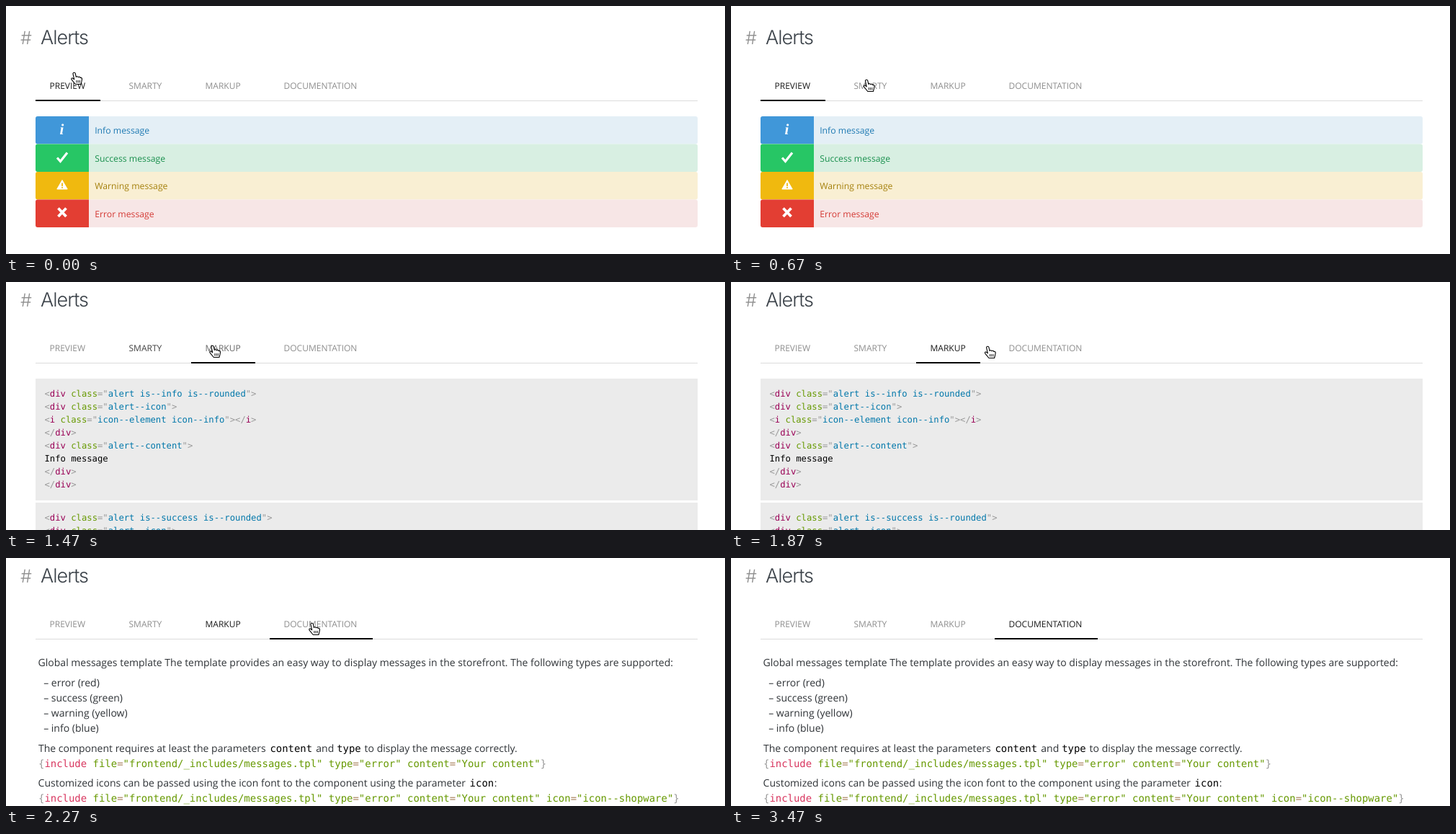
Animation of 998x344 px, one loop 3540 ms. Source, as an HTML page:

```html
<!DOCTYPE html>
<html lang="en">
<head>
<meta charset="utf-8">
<title>Alerts</title>
<style>
  html, body { margin: 0; width: 100%; height: 100%; overflow: hidden; background: #fff; }
  svg { display: block; width: 998px; height: 344px; }
  text { font-family: "Open Sans", sans-serif; white-space: pre; text-rendering: geometricPrecision; }
  .mono { font-family: "DejaVu Sans Mono", monospace; }
  .title { font-family: Inter, sans-serif; font-weight: 300; }
</style>
</head>
<body>
<svg id="stage" viewBox="0 0 998 344"></svg>
<script>
const LOOP = 3540, STEP = 1000 / 15;
const stage = document.getElementById('stage');

function el(tag, attrs, parent) {
  const node = document.createElementNS('http://www.w3.org/2000/svg', tag);
  for (const key in attrs) node.setAttribute(key, attrs[key]);
  parent.appendChild(node);
  return node;
}
const group = parent => el('g', {}, parent);
const rect = (parent, x, y, width, height, fill) => el('rect', { x, y, width, height, fill }, parent);
function text(parent, x, y, size, fill, str, attrs) {
  const node = el('text', { x, y, 'font-size': size, fill, ...attrs }, parent);
  node.textContent = str;
  return node;
}

// Syntax colouring: each capture group of the pattern has its own colour.
const SMARTY = {
  pattern: /("[^"]*")|([{}])|(include)|(=)|(\w+)/g,
  colors: ['#690', '#999', '#d8365f', '#a67f59', '#690']
};
const MARKUP = {
  pattern: /((?<=")[^"]+(?="))|([<>="\/]+)|(class)|(\w+)/g,
  colors: ['#07a', '#999', '#690', '#905']
};
function code(parent, x, y, size, str, lang) {
  const line = text(parent, x, y, size, '#000', '', { class: 'mono' });
  const add = (s, fill) => { if (s) el('tspan', { fill }, line).textContent = s; };
  let last = 0;
  for (const m of str.matchAll(lang.pattern)) {
    add(str.slice(last, m.index), '#000');
    add(m[0], lang.colors[m.slice(1).findIndex(g => g !== undefined)]);
    last = m.index + m[0].length;
  }
  add(str.slice(last), '#000');
}

// Heading and tabs
const page = group(stage);
text(page, 20, 53, 25, '#8f8f8f', '#', { class: 'title' });
text(page, 48, 53, 27, '#3a4148', 'Alerts', { class: 'title', 'letter-spacing': -1 });
rect(page, 41, 131, 919, 1, '#dcdcdc');
const bar = rect(page, 41, 130, 90, 2, '#000');
const tabs = [
  ['PREVIEW', 41, 90], ['SMARTY', 151, 86], ['MARKUP', 257, 89], ['DOCUMENTATION', 366, 143]
].map(([name, x, width]) => ({ x, width, label: text(page, x + 19.5, 115, 12, '#8e8e8e', name) }));

const views = tabs.map(() => group(stage));
const [preview, smarty, markup, docs] = views;

// Preview
const KINDS = ['Info', 'Success', 'Warning', 'Error'];
const alerts = [
  ['#4097d9', '#e4eff6', '#1f7ab3'],
  ['#27c665', '#d8efe2', '#1a904e'],
  ['#f0b90f', '#f9efd3', '#a5800c'],
  ['#e33e33', '#f7e6e6', '#d43b36']
];
alerts.forEach(([main, soft, ink], i) => {
  const y = 153 + 38.5 * i;
  el('rect', { x: 41, y, width: 919, height: 38.5, rx: 3, fill: soft }, preview);
  el('path', { d: `M115 ${y}v38.5H44q-3 0-3-3V${y + 3}q0-3 3-3z`, fill: main }, preview);
  text(preview, 123.2, y + 24, 12.25, ink, KINDS[i] + ' message');
});
text(preview, 74.5, 178, 21, '#fff', 'i', {
  style: 'font-family:"Liberation Serif",serif;font-weight:700;font-style:italic'
});
const stroke = (d, width, color) =>
  el('path', { d, fill: 'none', stroke: color, 'stroke-width': width }, preview);
stroke('M71 210.5l4.5 5L85 203.5', 3.2, '#fff');
el('path', { d: 'M78 241.5l7.2 12.5H70.8z', fill: '#fff', stroke: '#fff', 'stroke-linejoin': 'round' }, preview);
stroke('M78 245.5v4.4M78 251v1.8', 1.8, '#f0b90f');
stroke('M72.5 280.5l11 11.5M83.5 280.5l-11 11.5', 3.8, '#fff');

// Smarty
const INCLUDE = '{include file="frontend/_includes/messages.tpl"';
const SMALL = 12.21, ADVANCE = SMALL * 0.602;
KINDS.forEach((kind, i) => {
  const y = 134 + 45.65 * i;
  const line = `${INCLUDE} content="${kind} message" type="${kind.toLowerCase()}"}`;
  rect(smarty, 41, y, 919, 42.7, '#ebebeb');
  for (const m of line.matchAll(/=/g))
    rect(smarty, 53.5 + m.index * ADVANCE, y + 13.5, ADVANCE, 14, '#f5f5f5');
  code(smarty, 53.5, y + 25, SMALL, line, SMARTY);
});

// Markup
['Info', 'Success'].forEach((kind, i) => {
  const top = 134 + 172 * i, name = kind.toLowerCase();
  rect(markup, 41, top, 919, 169, '#ebebeb');
  [
    `<div class="alert is--${name} is--rounded">`,
    '<div class="alert--icon">',
    `<i class="icon--element icon--${name}"></i>`,
    '</div>',
    '<div class="alert--content">'
  ].forEach((line, n) => code(markup, 53.5, top + 25 + 18 * n, SMALL, line, MARKUP));
  text(markup, 53.5, top + 115, SMALL, '#000', kind + ' message', { class: 'mono' });
  for (const n of [6, 7]) code(markup, 53.5, top + 25 + 18 * n, SMALL, '</div>', MARKUP);
});

// Documentation
const BIG = 13.95, INK = '#2f3337';
const prose = (x, y, str) => text(docs, x, y, 14, INK, str);
const term = (x, y, str) => text(docs, x, y, BIG, '#000', str, { class: 'mono' });
prose(44.6, 150, 'Global messages template The template provides an easy way to display messages in the storefront. The following types are supported:');
['error (red)', 'success (green)', 'warning (yellow)', 'info (blue)']
  .forEach((item, i) => prose(52.2, 178 + 21 * i, '– ' + item));
prose(45, 269, 'The component requires at least the parameters');
term(366.4, 269, 'content');
prose(430.3, 269, 'and');
term(459.2, 269, 'type');
prose(497.6, 269, 'to display the message correctly.');
const CALL = INCLUDE + ' type="error" content="Your content"';
code(docs, 45, 290, BIG, CALL + '}', SMARTY);
prose(44.6, 317, 'Customized icons can be passed using the icon font to the component using the parameter');
term(643.6, 317, 'icon');
prose(677.8, 317, ':');
code(docs, 45, 338, BIG, CALL + ' icon="icon--shopware"}', SMARTY);

// Pointer
const pointer = group(stage);
const hand = group(pointer);
el('path', {
  d: 'M-1.6 1.4C-1.2-.8 1.4-.6 1.8 1.2L2.8 6C3.6 4.8 5.4 5 5.8 6.3C6.8 5.3 8.2 5.8 8.6 7.1C10 6.4 11.2 7.4 11 9.2L10.4 12.4L9.4 16H1.8L-2.6 10.6C-4.6 8.8-3.6 7-2 7.6L.2 9.4Z',
  fill: '#fff', stroke: '#000', 'stroke-width': 1.1, 'stroke-linejoin': 'round'
}, hand);
el('path', { d: 'M3.4 10.5v3.5M5.6 10.5v3.5M7.8 10.5v3.5', stroke: '#000', 'stroke-width': 0.9 }, hand);
const beam = el('path', {
  d: 'M-2.5 0Q0 0 0 2V14Q0 16 -2.5 16M2.5 0Q0 0 0 2M0 14Q0 16 2.5 16M-1.5 10H1.5',
  fill: 'none', stroke: '#000'
}, pointer);

// Moves: start, end, from x, from y, to x, to y
const moves = [
  [0, 560, 94.5, 92.5, 188, 102.5],
  [900, 1250, 188, 102.5, 286.5, 88.5],
  [1600, 2130, 286.5, 88.5, 424.5, 90.5],
  [2300, 2600, 424.5, 90.5, 440, 360]
];
// Time at which each tab opens
const opens = [-1000, 730, 1400, 2266];

const clamp = v => Math.min(1, Math.max(0, v));
const ease = u => u * u * (3 - 2 * u);
const mix = (a, b, u) => a + (b - a) * u;

function draw(t) {
  const now = opens.filter(start => t >= start).length - 1;
  const fade = clamp((t - opens[now]) / 200);
  page.setAttribute('transform', `translate(0 ${now ? -19 : 0})`);
  bar.setAttribute('x', tabs[now].x);
  bar.setAttribute('width', tabs[now].width);
  tabs.forEach((tab, i) => {
    const on = i === now ? fade : i === now - 1 ? 1 - fade : 0;
    const v = Math.round(mix(142, 26, on));
    tab.label.setAttribute('fill', `rgb(${v},${v},${v})`);
    views[i].setAttribute('display', i === now ? 'inline' : 'none');
  });

  const [start, end, x0, y0, x1, y1] = moves.filter(m => t >= m[0]).pop();
  const u = ease(clamp((t - start) / (end - start)));
  const y = mix(y0, y1, u);
  pointer.setAttribute('transform', `translate(${mix(x0, x1, u)} ${y})`);
  hand.setAttribute('display', y < 112 ? 'inline' : 'none');
  beam.setAttribute('display', y < 112 ? 'none' : 'inline');
}

const begin = performance.now();
function tick() {
  const t = (performance.now() - begin) % LOOP;
  draw(Math.floor((t + 5) / STEP) * STEP);
  requestAnimationFrame(tick);
}
tick();
</script>
</body>
</html>
```
